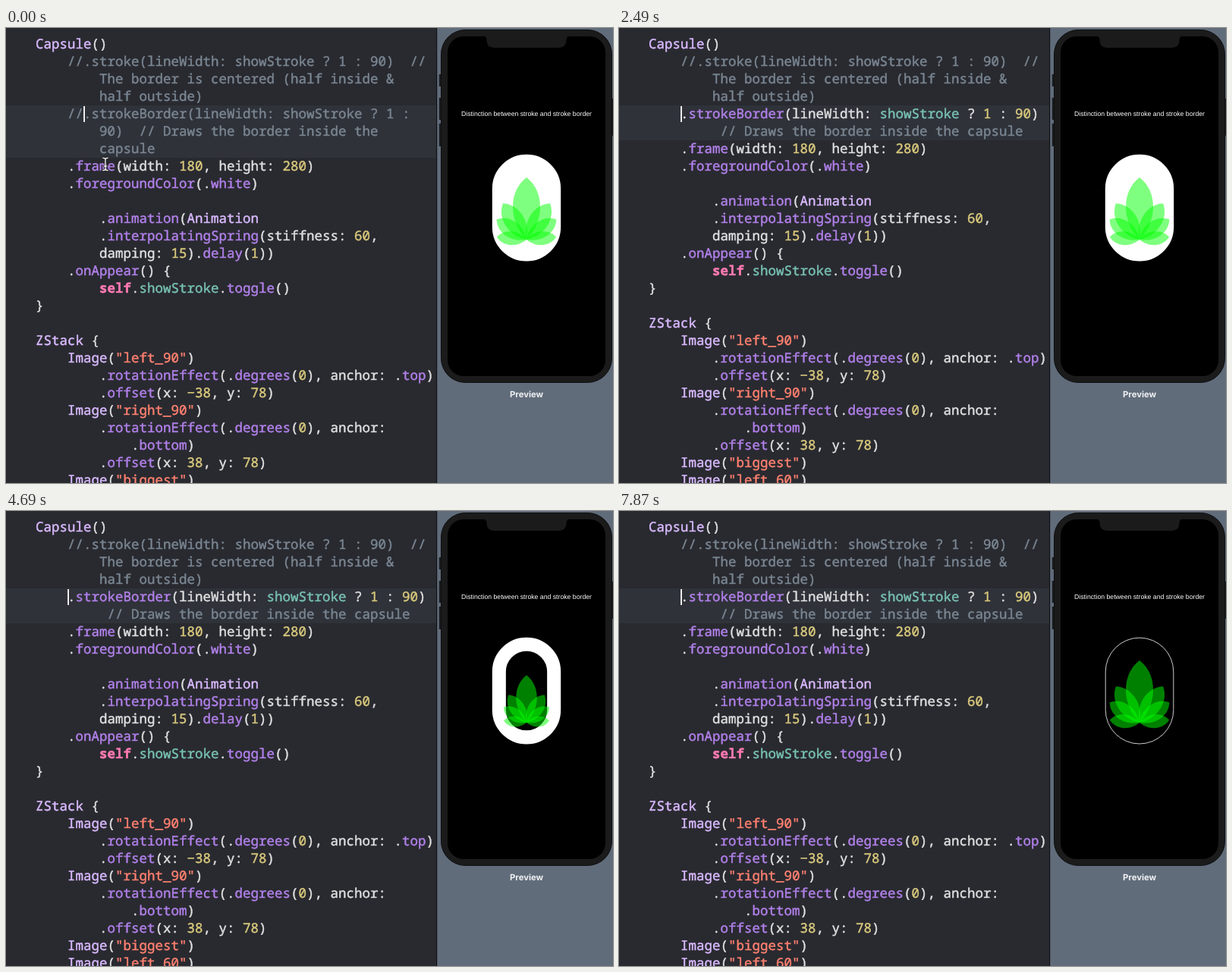
Animation of 800 by 600 pixels, one loop 8000 ms. Source, as an HTML page:

```html
<!DOCTYPE html>
<html lang="en">
<head>
<meta charset="utf-8">
<title>Stroke and stroke border</title>
<style>
html, body { margin: 0; width: 100%; height: 100%; overflow: hidden; background: #292a30; }
svg { display: block; width: 100vw; height: 100vh; }
text { white-space: pre; text-rendering: geometricPrecision; }
.code { font: 500 17.51px "Noto Sans Mono", "DejaVu Sans Mono", monospace; color: #e0e0e1; }
.code text, .code tspan { fill: currentColor; stroke: currentColor; stroke-width: .45px; }
.comment { color: #7a8692; }
.string { color: #ff8170; }
.number { color: #d9c97c; }
.type { color: #dabaff; }
.method { color: #b281eb; }
.prop { color: #78c2b3; }
.self { color: #ff7ab2; font-weight: 700; }
.label { font: 700 11.3px Inter, "Liberation Sans", sans-serif; fill: #f1f2f3; }
.caption { font: 8.7px "Liberation Sans", sans-serif; fill: #fff; text-anchor: middle; }
.clock { font: 600 7.6px Inter, "Liberation Sans", sans-serif; fill: #111; }
</style>
</head>
<body>
<svg viewBox="0 0 800 600" preserveAspectRatio="none">
  <defs>
    <path id="beam" d="M-3.2-8.2Q0-8.2 0-6V6Q0 8.2-3.2 8.2M3.2-8.2Q0-8.2 0-6V6Q0 8.2 3.2 8.2M-1.8 2.6H1.8"/>
  </defs>
  <rect width="800" height="600" fill="#292a30"/>
  <rect id="band" y="102" width="567" height="69" fill="#2f3239"/>
  <g id="head" class="code"></g>
  <g id="tail" class="code"></g>
  <rect id="caret" y="103" width="1.8" height="21" fill="#fff"/>
  <g id="mouse" fill="none" stroke-linecap="round">
    <use href="#beam" stroke="#222" stroke-width="2.8"/>
    <use href="#beam" stroke="#fff" stroke-width="1.3"/>
  </g>

  <rect x="567" width="233" height="600" fill="#616c7b"/>
  <rect x="567" width="1.2" height="600" fill="#101114"/>
  <path d="M572 61V77M572 92V121M572 126V156M799 93V142" stroke="#1b1c1e" stroke-width="2.4"/>
  <rect x="573.5" y="2.5" width="225" height="465" rx="32" fill="#1b1b1c" stroke="#0e0e0f"/>
  <rect id="screen" x="582" y="11" width="208" height="448" rx="21"/>
  <path d="M629 10.5Q633.5 11 633.5 15.5Q633.5 26 644 26H728Q738.5 26 738.5 15.5Q738.5 11 743 10.5Z" fill="#1b1b1c"/>

  <g id="status">
    <text class="clock" x="600" y="25">09:41</text>
    <path d="M754.4 21.3Q758 18.2 761.6 21.3M756 23Q758 21.3 760 23" fill="none" stroke="#111" stroke-width="1.2"/>
    <circle cx="758" cy="24.6" r=".9" fill="#111"/>
    <rect x="766" y="19.6" width="10.5" height="5.4" rx="1.5" fill="#111"/>
    <rect x="777.1" y="21.3" width="1" height="2" rx=".5" fill="#111"/>
  </g>
  <g id="app">
    <text class="caption" x="686" y="116">Distinction between stroke and stroke border</text>
    <rect id="capsule" stroke="#fff"/>
    <g id="leaf" fill="#0f0" fill-opacity=".5"></g>
  </g>
  <g id="spinner" stroke="#fff" stroke-width="1.4" stroke-linecap="round"></g>
  <text id="label" class="label" y="487">Preview</text>
</svg>
<script>
const NS = 'http://www.w3.org/2000/svg';
const $ = id => document.getElementById(id);
const LOOP = 8000, LEFT = 39, ADVANCE = 10.506, ROW = 23;

function set(node, attrs) {
  for (const key in attrs) node.setAttribute(key, attrs[key]);
  return node;
}
function add(parent, tag, attrs) {
  return parent.appendChild(set(document.createElementNS(NS, tag), attrs));
}
const show = (node, on) => set(node, { visibility: on ? 'visible' : 'hidden' });

// Syntax colouring
const RULES = [
  ['comment', /^\/\/.*/],
  ['string', /^"[^"]*"/],
  ['self', /^self\b/],
  ['prop', /^showStroke\b/],
  ['type', /^(Capsule|Animation|ZStack|Image)\b/],
  ['method', /^(strokeBorder|frame|foregroundColor|white|animation|interpolatingSpring|delay|onAppear|toggle|rotationEffect|degrees|offset|top|bottom)\b/],
  ['number', /^−?\d+/],
  ['', /^(\w+|[^\w])/]
];
function codeLine(parent, row, indent, source, grey) {
  const line = add(parent, 'text', { x: LEFT + indent * ADVANCE, y: 27 + row * ROW });
  if (grey) {
    line.setAttribute('class', 'comment');
    line.textContent = source;
    return;
  }
  for (let rest = source; rest;) {
    const [kind, rule] = RULES.find(r => r[1].test(rest));
    const word = rest.match(rule)[0];
    add(line, 'tspan', kind ? { class: kind } : {}).textContent = word;
    rest = rest.slice(word.length);
  }
}

const head = $('head'), tail = $('tail');
codeLine(head, 0, 0, 'Capsule()');
codeLine(head, 1, 4, '//.stroke(lineWidth: showStroke ? 1 : 90)  //', true);
codeLine(head, 2, 8, 'The border is centered (half inside &', true);
codeLine(head, 3, 8, 'half outside)', true);

const border = '.strokeBorder(lineWidth: showStroke ? 1 : 90)';
const remark = '// Draws the border inside the capsule';
const edits = [
  [[4, '//.strokeBorder(lineWidth: showStroke ? 1 :'], [8, '90)  // Draws the border inside the'], [8, 'capsule']],
  [[4, '/' + border], [9, remark]],
  [[4, border], [9, remark]],
  [[4, border], [9, remark]]
].map((lines, i) => {
  const group = add(head, 'g', {});
  lines.forEach(([indent, source], n) => codeLine(group, 4 + n, indent, source, i < 3));
  return group;
});

[
  [4, '.frame(width: 180, height: 280)'],
  [4, '.foregroundColor(.white)'],
  [0, ''],
  [8, '.animation(Animation'],
  [8, '.interpolatingSpring(stiffness: 60,'],
  [8, 'damping: 15).delay(1))'],
  [4, '.onAppear() {'],
  [8, 'self.showStroke.toggle()'],
  [0, '}'],
  [0, ''],
  [0, 'ZStack {'],
  [4, 'Image("left_90")'],
  [8, '.rotationEffect(.degrees(0), anchor: .top)'],
  [8, '.offset(x: −38, y: 78)'],
  [4, 'Image("right_90")'],
  [8, '.rotationEffect(.degrees(0), anchor:'],
  [12, '.bottom)'],
  [8, '.offset(x: 38, y: 78)'],
  [4, 'Image("biggest")'],
  [4, 'Image("left_60")']
].forEach(([indent, source], n) => codeLine(tail, 7 + n, indent, source));

// A petal grows upwards from the origin, then leans by an angle
function petal(angle, length, half) {
  const p = (x, y) => `${x * half} ${-y * length} `;
  const d = 'M' + p(0, 1) +
    'C' + p(.7, .88) + p(1, .71) + p(1, .52) +
    'C' + p(1, .3) + p(.5, .11) + p(0, 0) +
    'C' + p(-.5, .11) + p(-1, .3) + p(-1, .52) +
    'C' + p(-1, .71) + p(-.7, .88) + p(0, 1) + 'Z';
  add($('leaf'), 'path', { d, transform: `rotate(${angle})` });
}
petal(0, 82, 18);
for (const side of [-1, 1]) {
  petal(side * 85, 39.3, 9);
  petal(side * 33, 57, 13);
  petal(side * 56, 47.5, 11);
}

const spokes = Array.from({ length: 12 }, (_, i) =>
  add($('spinner'), 'path', { d: 'M0-4V-7.3', transform: `translate(662 483) rotate(${i * 30})` }));

// Remaining distance of a unit-mass spring after s seconds
function spring(s, stiffness, damping) {
  if (s <= 0) return 1;
  const decay = damping / 2, w = Math.sqrt(stiffness - decay * decay);
  return Math.exp(-decay * s) * (Math.cos(w * s) + decay / w * Math.sin(w * s));
}
function ease(t, from, to) {
  const u = Math.min(1, Math.max(0, (t - from) / (to - from)));
  return u * u * (3 - 2 * u);
}

const BLINKS = [310, 840, 1370, 1900, 3050, 3590, 4150, 4680, 5210, 5680, 6220, 6780, 7310, 7870];
const EDITS = [2330, 2410, 2490];
const LAUNCH = 3330, READY = 3490, SPRING = 4430;
const CAPSULE = { x: 640.8, y: 166.8, width: 90.4, height: 140.6 };
const passed = (times, t) => times.filter(at => t >= at).length;

function draw(t) {
  const edit = passed(EDITS, t);
  edits.forEach((group, i) => show(group, i === edit));
  set(tail, { transform: `translate(0 ${edit ? -ROW : 0})` });
  set($('band'), { height: edit ? 46 : 69 });
  set($('caret'), { x: [102.2, 92, 81.2, 81.2][edit] });
  show($('caret'), passed(BLINKS, t) % 2 === 0);

  const a = ease(t, 70, 310), b = ease(t, 480, 910);
  set($('mouse'), { transform: `translate(${131 - 19 * a - 6 * b} ${179.5 - 32.5 * a - 27 * b})` });
  show($('mouse'), !edit);

  const blank = t >= LAUNCH && t < READY;
  set($('screen'), { fill: blank ? '#fff' : '#000' });
  show($('status'), blank);
  show($('app'), !blank);

  const busy = t >= 3210 && t < 3590;
  show($('spinner'), busy);
  set($('label'), { x: busy ? 674 : 664 });
  const lead = Math.floor(t / 60) % 12;
  spokes.forEach((spoke, i) => set(spoke, { opacity: .15 + .6 * ((i - lead + 12) % 12) / 11 }));

  const restarted = t >= READY, s = (t - SPRING) / 1000;
  const { x, y, width, height } = CAPSULE;
  const w = .8 + (width / 2 - .8) * (restarted ? Math.max(0, spring(s, 60, 15)) : 1);
  set($('capsule'), {
    x: x + w / 2, y: y + w / 2, width: width - w, height: height - w, rx: (width - w) / 2,
    'stroke-width': w, fill: restarted && s > 0 ? 'none' : '#fff'
  });
  const size = restarted ? 1 - spring(s, 60, 10) : 1;
  set($('leaf'), { transform: `translate(686 279) scale(${size})` });
}

function tick() {
  draw(performance.now() % LOOP);
  requestAnimationFrame(tick);
}
tick();
</script>
</body>
</html>
```
